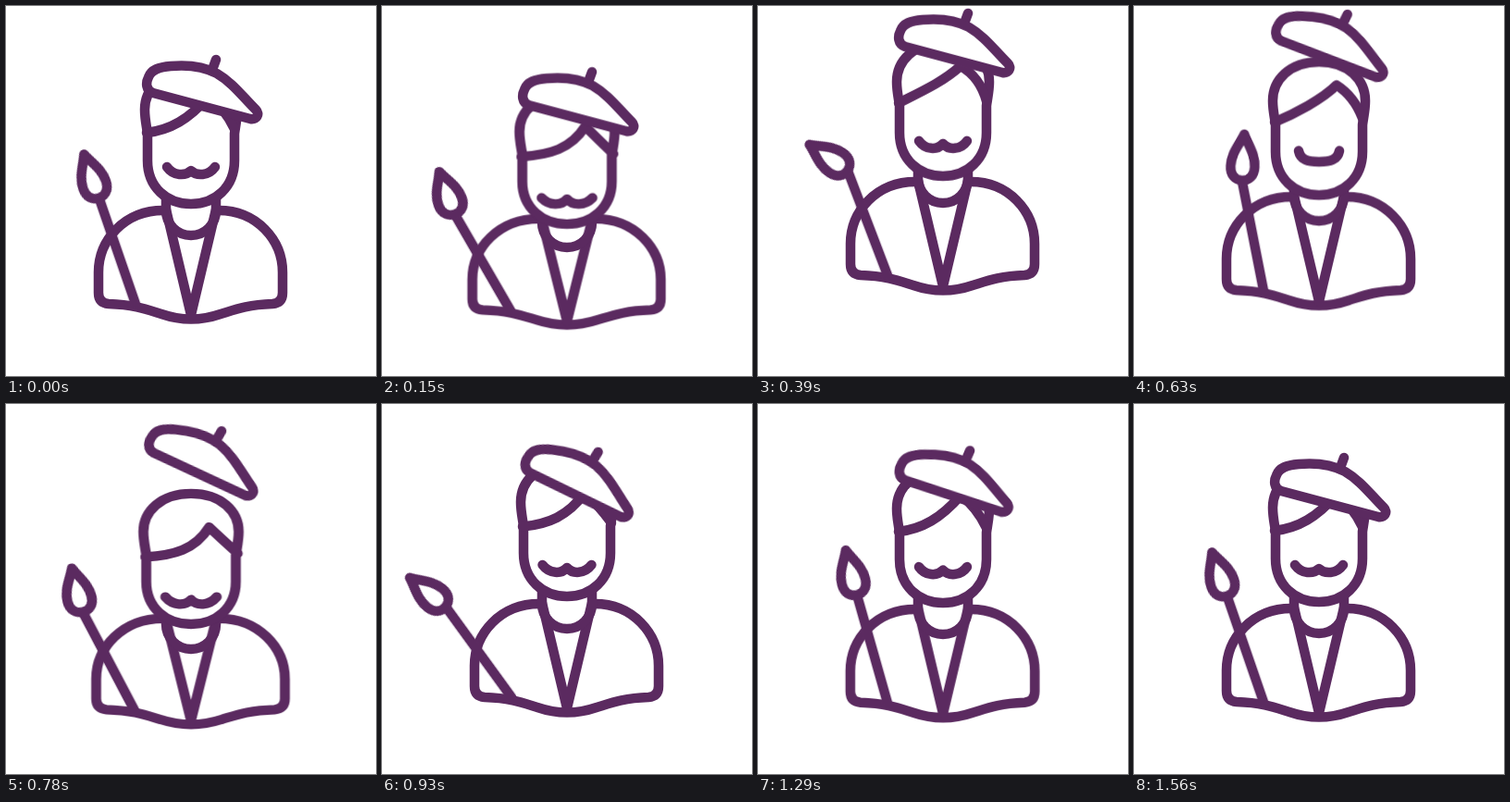
An HTML page without scripts that plays this animation: 400x400 px, repeating every 3.59 s.

```html
<!DOCTYPE html>
<html lang="en">
<head>
<meta charset="utf-8">
<title>Painter</title>
<style>
html, body { margin: 0; height: 100%; overflow: hidden; background: #fff; }
svg { display: block; width: 100vw; height: 100vh; fill: none; stroke: #5b2a60; stroke-width: 10.5; stroke-linecap: round; stroke-linejoin: round; }
.solid { fill: #fff; }
.body, .neck, .head, .hat, .brush, .tip, .fringe, .lip { animation: 3590ms linear infinite; }
.body { animation-name: body; transform-origin: 200px 339px; }
.neck { animation-name: neck; stroke-linecap: butt; }
.head { animation-name: head; transform-origin: 200px 214px; }
.hat { animation-name: hat; transform-origin: 210px 94px; }
.brush { animation-name: brush; }
.tip { animation-name: tip; }
.fringe { animation-name: fringe; }
.lip { animation-name: lip; }

/* jump, land, settle */
@keyframes body {
  0%, .84% { transform: none; animation-timing-function: ease-in-out; }
  3.34% { transform: translateY(8px) scale(1.025, .975); animation-timing-function: ease-in; }
  7.52% { transform: translateY(-18px); }
  10.86% { transform: translateY(-31px); animation-timing-function: ease-out; }
  12.81% { transform: translateY(-33px); animation-timing-function: ease-in; }
  17.55% { transform: translateY(-15px); animation-timing-function: ease-out; }
  21.73% { transform: translateY(8px) scale(1.025, .975); animation-timing-function: ease-in-out; }
  25.91% { transform: translateY(-5px); animation-timing-function: ease-in-out; }
  30.08% { transform: translateY(-2px); }
  33.43% { transform: translateY(2px) scale(1.006, .994); animation-timing-function: ease-in-out; }
  37.6%, 100% { transform: none; }
}
@keyframes neck {
  0%, .84% { transform: none; animation-timing-function: ease-in-out; }
  3.34% { transform: translateY(15px); animation-timing-function: ease-in; }
  7.52% { transform: translateY(-16px); }
  10.86% { transform: translateY(-35px); animation-timing-function: ease-out; }
  12.81% { transform: translateY(-37px); animation-timing-function: ease-in; }
  17.55% { transform: translateY(-16px); animation-timing-function: ease-out; }
  21.73% { transform: translateY(17px); animation-timing-function: ease-in-out; }
  25.91% { transform: translateY(-5px); animation-timing-function: ease-in-out; }
  30.08% { transform: translateY(-2px); }
  33.43% { transform: translateY(3px); animation-timing-function: ease-in-out; }
  37.6%, 100% { transform: none; }
}
@keyframes head {
  0%, .84% { transform: none; animation-timing-function: ease-in-out; }
  3.62% { transform: translateY(23px) scale(1.03, .98); animation-timing-function: ease-in; }
  7.52% { transform: translateY(-10px); }
  10.86% { transform: translateY(-30px); animation-timing-function: ease-out; }
  13.37% { transform: translateY(-36px); animation-timing-function: ease-in; }
  17.55% { transform: translateY(-10px); animation-timing-function: ease-out; }
  21.73% { transform: translateY(24px) scale(1.03, .98); animation-timing-function: ease-in-out; }
  25.91% { transform: translateY(-6px); animation-timing-function: ease-in-out; }
  30.08% { transform: translateY(-2px); }
  33.43% { transform: translateY(3px); animation-timing-function: ease-in-out; }
  37.6%, 100% { transform: none; }
}
@keyframes hat {
  0%, .84% { transform: none; animation-timing-function: ease-in-out; }
  3.34% { transform: translateY(16px); animation-timing-function: ease-in; }
  7.52% { transform: translateY(-25px); }
  10.86% { transform: translateY(-50px); animation-timing-function: ease-out; }
  13.93% { transform: translateY(-57px) rotate(2deg); animation-timing-function: ease-in; }
  17.55% { transform: translateY(-51px) rotate(6deg); }
  21.73% { transform: translateY(-32.5px) rotate(10deg); animation-timing-function: ease-out; }
  25.91% { transform: translateY(-10px) rotate(11deg); animation-timing-function: ease-in-out; }
  30.08% { transform: translateY(-18px) rotate(9.5deg); animation-timing-function: ease-out; }
  31.75% { transform: translateY(-22px) rotate(8deg); animation-timing-function: ease-in; }
  37.6% { transform: translateY(1px); animation-timing-function: ease-out; }
  40%, 100% { transform: none; }
}
@keyframes brush {
  0%, .84% { transform: rotate(-19deg); animation-timing-function: ease-in; }
  3.34% { transform: rotate(-26deg); animation-timing-function: ease-out; }
  6.96% { transform: rotate(-34deg); animation-timing-function: ease-in; }
  7.52% { transform: rotate(-33deg); }
  10.86% { transform: rotate(-21deg); animation-timing-function: ease-out; }
  15.04% { transform: rotate(-9deg); animation-timing-function: ease-in; }
  17.55% { transform: rotate(-11deg); }
  21.73% { transform: rotate(-26.5deg); animation-timing-function: ease-out; }
  25.91% { transform: rotate(-36deg); animation-timing-function: ease-in; }
  30.08% { transform: rotate(-22.5deg); animation-timing-function: ease-out; }
  33.98% { transform: rotate(-14deg); animation-timing-function: ease-in-out; }
  37.6% { transform: rotate(-17deg); animation-timing-function: ease-out; }
  43.45%, 100% { transform: rotate(-19deg); }
}
@keyframes tip {
  0%, .84% { transform: none; animation-timing-function: ease-in-out; }
  3.34% { transform: rotate(12deg); animation-timing-function: ease-in; }
  7.52% { transform: rotate(-21deg); animation-timing-function: ease-out; }
  10.86% { transform: rotate(-35deg); animation-timing-function: ease-in; }
  15.04% { transform: rotate(-5deg); }
  17.55% { transform: rotate(14deg); animation-timing-function: ease-out; }
  19.5% { transform: rotate(18deg); animation-timing-function: ease-in; }
  21.73% { transform: rotate(13.5deg); }
  25.91% { transform: rotate(-15deg); animation-timing-function: ease-out; }
  30.08% { transform: rotate(-34deg); animation-timing-function: ease-in; }
  33.98% { transform: rotate(-10deg); animation-timing-function: ease-out; }
  37.6% { transform: rotate(6deg); animation-timing-function: ease-in-out; }
  43.45%, 100% { transform: none; }
}
@keyframes fringe {
  0%, .84%, 30.08%, 100% { d: path("M152 137C178 134 198 122 219 98Q236 110 247 133"); }
  3.62%, 21.73% { d: path("M152 140C182 138 204 132 219 107Q230 118 249 136"); }
  7.52% { d: path("M152 138C184 134 204 126 220 102Q232 118 247 140"); }
  10.86% { d: path("M152 135C178 122 200 112 219 95Q240 107 247 133"); }
  17.55% { d: path("M152 135C174 126 204 110 219 95Q238 107 247 131"); }
}
@keyframes lip {
  0%, .84%, 43.45%, 100% { d: path("M174 174C181 184 194 184 200 178C206 184 219 184 226 174"); }
  3.62%, 21.73% { d: path("M173 184C181 194 194 194 200 187C206 194 219 194 227 184"); }
  7.52% { d: path("M175 191C184 194 195 192 200 183C205 192 216 194 225 191"); }
  10.86%, 30.08% { d: path("M174 176C181 186 194 186 200 179C206 186 219 186 226 176"); }
  17.55% { d: path("M178 166C180 176 188 178 200 178C212 178 220 176 222 166"); }
}
</style>
</head>
<body>
<svg viewBox="0 0 400 400">
  <g class="body">
    <path d="M170 221C128 221 100 253 100 288V310Q100 321 111 322C140 323 152 328 168 333Q200 344 232 333C248 328 260 323 288 322Q299 321 299 310V288C299 253 271 221 230 221"/>
    <path d="M173 220L200 334L227 220"/>
    <g transform="translate(140 322)">
      <g class="brush">
        <path d="M0 0V-121"/>
        <g transform="translate(0 -121)">
          <path class="tip solid" d="M0-50C5-38 13-29 13-15C13-5 7 0 0 0S-13-5-13-15C-13-29-5-38 0-50Z"/>
        </g>
      </g>
    </g>
  </g>
  <path class="neck" d="M173 206V221A27 27 0 0 0 227 221V206"/>
  <g class="head">
    <path class="solid" d="M200 70C168 70 150 90 150 112C150 122 152 130 153 138V167C153 196 174 214 200 214S247 196 247 167V138C248 130 250 122 250 112C250 90 232 70 200 70Z"/>
    <path class="fringe" d="M152 137C178 134 198 122 219 98Q236 110 247 133"/>
    <path class="lip" d="M174 174C181 184 194 184 200 178C206 184 219 184 226 174"/>
  </g>
  <g class="hat">
    <path d="M227 58L223 69"/>
    <path class="solid" d="M159 94C151 91 151 83 154 77C157 69 165 66 178 65C200 63 215 66 228 73C245 83 255 97 270 112C275 117 271 123 264 122Z"/>
  </g>
</svg>
</body>
</html>
```
